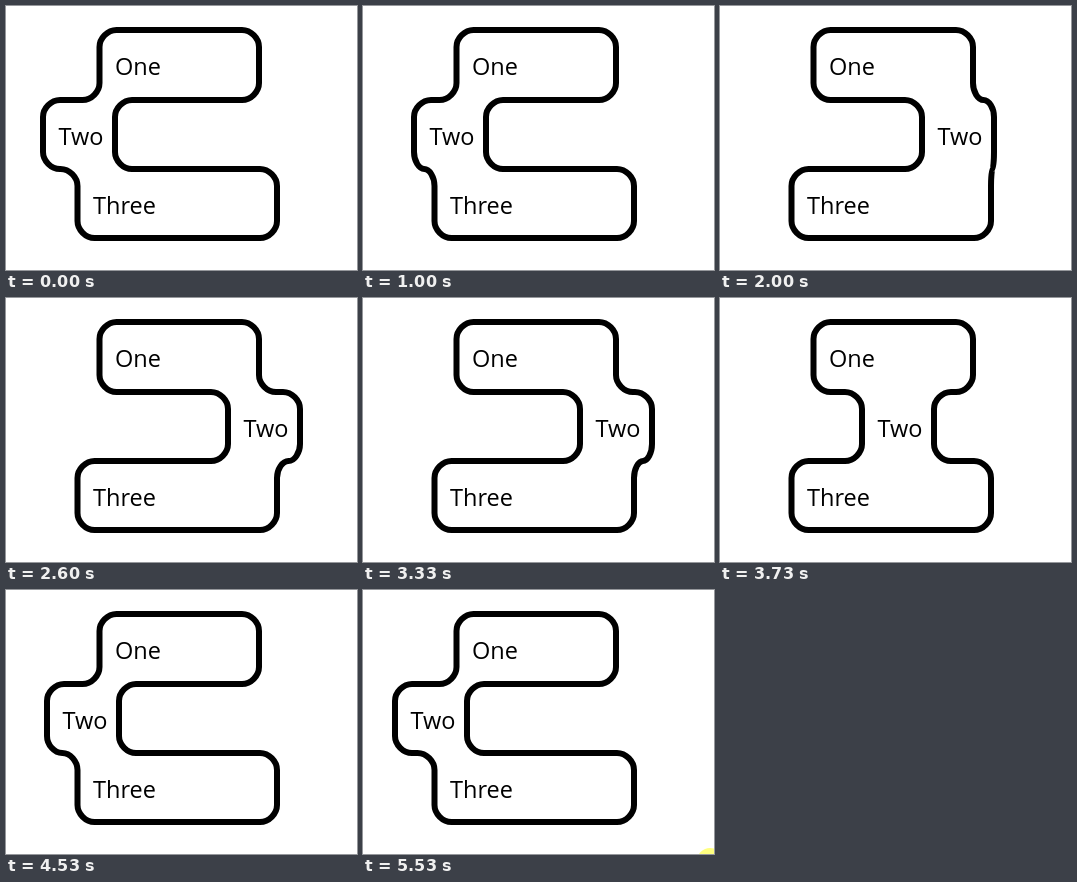
Write an HTML page with a canvas that moves like this. It is 351 px wide and 264 px high and loops after 5670 ms.

```html
<!DOCTYPE html>
<html lang="en">
<head>
<meta charset="utf-8">
<title>Joined boxes</title>
<style>
  html, body { margin: 0; width: 100%; height: 100%; overflow: hidden; background: #fff; }
  canvas { display: block; }
</style>
</head>
<body>
<canvas id="stage" width="351" height="264"></canvas>
<script>
const ctx = document.getElementById('stage').getContext('2d');
const LOOP = 5670, RADIUS = 17, BEND = 0.52;
const ROW_Y = [24, 94, 163, 232];

// Each drag: [start ms, ticks, left edge of the middle box at the end]
const DRAGS = [
  [0, 1, 37], [350, 1, 41], [1000, 1, 51], [1060, 8, 136], [1600, 7, 202],
  [2200, 2, 212], [2470, 1, 217], [2600, 1, 222], [3330, 1, 217], [3400, 8, 117],
  [3930, 4, 89], [4200, 5, 50], [4530, 1, 41], [4660, 1, 32]
];

const tick = ms => Math.floor((ms + 6.7) * 0.015); // 15 ticks per second

function middleLeft(t) {
  let x = 32;
  for (const [start, ticks, end] of DRAGS) {
    if (t < start) break;
    const done = Math.min(ticks, tick(t) - tick(start) + 1);
    x += (end - x) * done / ticks;
  }
  return x;
}

function corner(x0, y0, cx, cy, x1, y1) {
  const mix = (a, b) => a + (b - a) * BEND;
  ctx.lineTo(x0, y0);
  ctx.bezierCurveTo(mix(x0, cx), mix(y0, cy), mix(x1, cx), mix(y1, cy), x1, y1);
}

// Moves from edge x0 to edge x1 at height y; dir is 1 going down, -1 going up
function step(x0, x1, y, dir) {
  const half = (x1 - x0) / 2;
  const run = Math.sign(half) * Math.min(RADIUS, Math.abs(half));
  corner(x0, y - dir * RADIUS, x0, y, x0 + run, y);
  corner(x1 - run, y, x1, y, x1, y + dir * RADIUS);
}

function outline(rows) {
  const [one, two, three] = rows;
  const [top, y1, y2, bottom] = ROW_Y;
  const r = RADIUS;
  ctx.beginPath();
  corner(one[0], top + r, one[0], top, one[0] + r, top);
  corner(one[1] - r, top, one[1], top, one[1], top + r);
  step(one[1], two[1], y1, 1);
  step(two[1], three[1], y2, 1);
  corner(three[1], bottom - r, three[1], bottom, three[1] - r, bottom);
  corner(three[0] + r, bottom, three[0], bottom, three[0], bottom - r);
  step(three[0], two[0], y2, -1);
  step(two[0], one[0], y1, -1);
  ctx.closePath();
  ctx.stroke();
}

function draw(now) {
  const t = now % LOOP;
  const x = middleLeft(t);
  const rows = [[93.5, 253], [x, x + 72], [71.5, 271]];

  ctx.fillStyle = '#fff';
  ctx.fillRect(0, 0, 351, 264);
  ctx.lineWidth = 6;
  outline(rows);

  ctx.fillStyle = '#000';
  ctx.font = '23.5px "Open Sans", "Noto Sans", sans-serif';
  ['One', 'Two', 'Three'].forEach((label, i) =>
    ctx.fillText(label, rows[i][0] + 15.5, ROW_Y[i] + 45));

  if (t >= 5530) {
    ctx.fillStyle = '#ffff80';
    ctx.beginPath();
    ctx.arc(347, 271, 13, 0, 7);
    ctx.fill();
  }
  requestAnimationFrame(draw);
}
requestAnimationFrame(draw);
</script>
</body>
</html>
```
